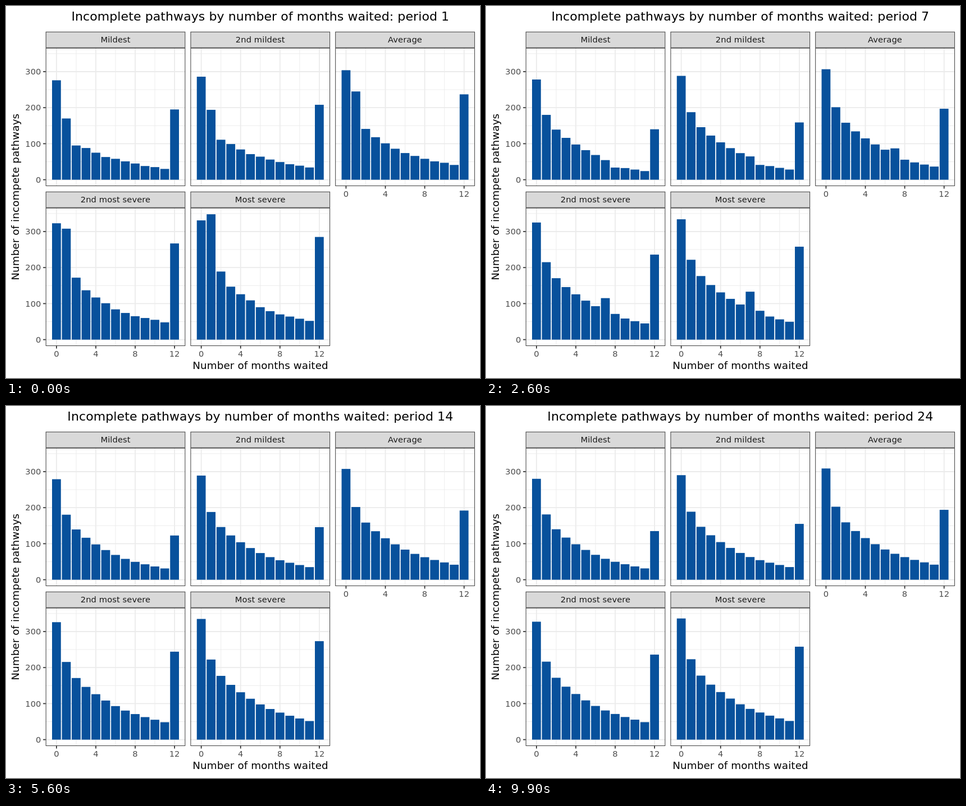
Recreate the animation shown at these times as an HTML page. Size 844 by 663 pixels, loop 10000 ms.

```html
<!DOCTYPE html>
<html lang="en">
<head>
<meta charset="utf-8">
<title>Incomplete pathways</title>
<style>
  html, body { margin: 0; width: 100%; height: 100%; overflow: hidden; background: #fff; }
  svg { display: block; width: 844px; height: 663px; }
  text { font-family: "DejaVu Sans", sans-serif; letter-spacing: 0.1px; }
</style>
</head>
<body>
<svg id="chart" viewBox="0 0 844 663"></svg>
<script>
const svg = document.getElementById("chart");
const PERIODS = 24, FRAMES = 100, FRAME_MS = 100;
const STEP = (FRAMES - 1) / (PERIODS - 1);
const OLDEST = 12;

// Geometry
const PANEL = { x: 70.7, y: 74.7, w: 248.6, h: 246.2, dx: 257.77, dy: 285 };
const STRIP_H = 28.9;
const UNIT_X = PANEL.w / 14.19, UNIT_Y = 0.642;
const ZERO_X = 1.095 * UNIT_X, ZERO_Y = 309.6 - PANEL.y;
const BAR_W = 0.9 * UNIT_X;

// Long-run profile by month waited, blended between the two extremes
const MILD = [279, 180.5, 139.5, 116.5, 98, 82.3, 68.8, 57.8, 49.5, 42.8, 36.8, 31.3];
const SEVERE = [335, 222.3, 177, 152, 131.5, 113.5, 97.7, 85, 75, 66.3, 58.7, 51.6];
const ANCHORS = [1, 4, 7, 9, 11, 17, 24];

const groups = [
  { name: "Mildest", mix: 0,
    start: [276, 170, 95, 88, 75, 63, 58, 51, 45, 38, 35, 30],
    tail: [195, 161, 140, 126, 115, 128, 135] },
  { name: "2nd mildest", mix: 0.18,
    start: [286, 194, 111, 99, 84, 71, 64, 56, 49, 43, 39, 34],
    tail: [208, 179, 159, 147, 138, 150, 155] },
  { name: "Average", mix: 0.51,
    start: [304, 245, 141, 118, 101, 86, 74, 66, 58, 51, 47, 41],
    tail: [237, 214, 197, 188, 182, 193, 194] },
  { name: "2nd most severe", mix: 0.84,
    start: [323, 308, 172, 137, 117, 101, 84, 74, 65, 60, 55, 48],
    tail: [267, 251, 236, 231, 231, 240, 236] },
  { name: "Most severe", mix: 1,
    start: [331, 348, 189, 147, 126, 109, 90, 79, 70, 64, 58, 52],
    tail: [285, 272, 258, 255, 257, 266, 258] }
];

// Opening cohorts age along the long-run profile; newer ones follow it
function monthValue(group, period, month) {
  const base = m => MILD[m] + group.mix * (SEVERE[m] - MILD[m]);
  if (period === 1 || month >= period) {
    const age = month - period + 1;
    return group.start[age] * base(month) / base(age);
  }
  return base(month) * (1 + 0.0004 * (period - 14));
}

// The 12+ stock keeps a share of itself and gains those leaving month 11
function tailValues(group) {
  const out = [];
  const gain = 0.74 + 0.1 * group.mix;
  for (let a = 0; a < ANCHORS.length - 1; a++) {
    const from = ANCHORS[a], to = ANCHORS[a + 1];
    const run = [group.tail[a]];
    for (let p = from; p < to; p++) {
      run.push(0.83 * run[p - from] + gain * monthValue(group, p, 11));
    }
    const miss = group.tail[a + 1] - run[to - from];
    run.forEach((v, i) => { out[from + i] = v + miss * i / (to - from); });
  }
  return out;
}

function add(parent, tag, attrs, content) {
  const el = document.createElementNS("http://www.w3.org/2000/svg", tag);
  for (const key in attrs) el.setAttribute(key, attrs[key]);
  if (content !== undefined) el.textContent = content;
  parent.appendChild(el);
  return el;
}

function label(parent, x, y, size, content, fill = "#000", anchor = "middle") {
  return add(parent, "text", { x, y, "font-size": size, fill, "text-anchor": anchor }, content);
}

function line(parent, x1, y1, x2, y2, stroke, width) {
  add(parent, "line", { x1, y1, x2, y2, stroke, "stroke-width": width });
}

function box(parent, y, h, fill) {
  add(parent, "rect", { x: 0.45, y: y + 0.45, width: PANEL.w - 0.9, height: h - 0.9,
    fill, stroke: "#333", "stroke-width": 0.95 });
}

const atX = m => ZERO_X + m * UNIT_X;
const atY = v => ZERO_Y - v * UNIT_Y;

function buildPanel(group, index) {
  const col = index % 3, row = Math.floor(index / 3);
  const g = add(svg, "g", {
    transform: `translate(${PANEL.x + col * PANEL.dx} ${PANEL.y + row * PANEL.dy})`
  });
  for (let v = 50; v <= 350; v += 100) line(g, 0, atY(v), PANEL.w, atY(v), "#ebebeb", 0.9);
  for (let m = 2; m <= 10; m += 4) line(g, atX(m), 0, atX(m), PANEL.h, "#ebebeb", 0.9);
  for (let v = 0; v <= 300; v += 100) line(g, 0, atY(v), PANEL.w, atY(v), "#ebebeb", 1.78);
  for (let m = 0; m <= 12; m += 4) line(g, atX(m), 0, atX(m), PANEL.h, "#ebebeb", 1.78);

  group.bars = [];
  for (let m = 0; m <= OLDEST; m++) {
    group.bars.push(add(g, "rect", { x: atX(m) - BAR_W / 2, width: BAR_W, fill: "#08519c" }));
  }

  box(g, 0, PANEL.h, "none");
  box(g, -STRIP_H, STRIP_H, "#d9d9d9");
  label(g, PANEL.w / 2, -9.3, 14.67, group.name, "#1a1a1a");

  if (col === 0) {
    for (let v = 0; v <= 300; v += 100) {
      line(g, -4.6, atY(v), 0, atY(v), "#333", 1.78);
      label(g, -8.2, atY(v) + 5.3, 14.67, v, "#4d4d4d", "end");
    }
  }
  if (index >= 2) {
    for (let m = 0; m <= 12; m += 4) {
      line(g, atX(m), PANEL.h, atX(m), PANEL.h + 4.6, "#333", 1.78);
      label(g, atX(m), PANEL.h + 19.2, 14.67, m, "#4d4d4d");
    }
  }
}

add(svg, "rect", { width: 844, height: 663, fill: "#fff" });
const title = label(svg, 452.8, 26.2, 22, "");
label(svg, 453, 647.3, 18.33, "Number of months waited");
label(add(svg, "g", { transform: "translate(23.4 340.3) rotate(-90)" }),
  0, 0, 18.33, "Number of incompete pathways");

groups.forEach((group, i) => {
  buildPanel(group, i);
  const tail = tailValues(group);
  group.values = [];
  for (let p = 1; p <= PERIODS; p++) {
    group.values.push(group.bars.map((_, m) =>
      m === OLDEST ? tail[p] : monthValue(group, p, m)));
  }
});

function draw(ms) {
  const frame = Math.floor(ms / FRAME_MS) % FRAMES;
  let k = 0;
  while (k < PERIODS - 1 && Math.round((k + 1) * STEP) <= frame) k++;
  const moving = k < PERIODS - 1 && frame >= Math.ceil((k + 0.5) * STEP);
  const next = moving ? k + 1 : k;

  title.textContent = `Incomplete pathways by number of months waited: period ${next + 1}`;
  for (const { bars, values } of groups) {
    bars.forEach((bar, m) => {
      const v = (values[k][m] + values[next][m]) / 2;
      bar.setAttribute("y", atY(v));
      bar.setAttribute("height", v * UNIT_Y);
    });
  }
}

const began = performance.now();
function tick() {
  draw(performance.now() - began);
  requestAnimationFrame(tick);
}
draw(0);
requestAnimationFrame(tick);
</script>
</body>
</html>
```
